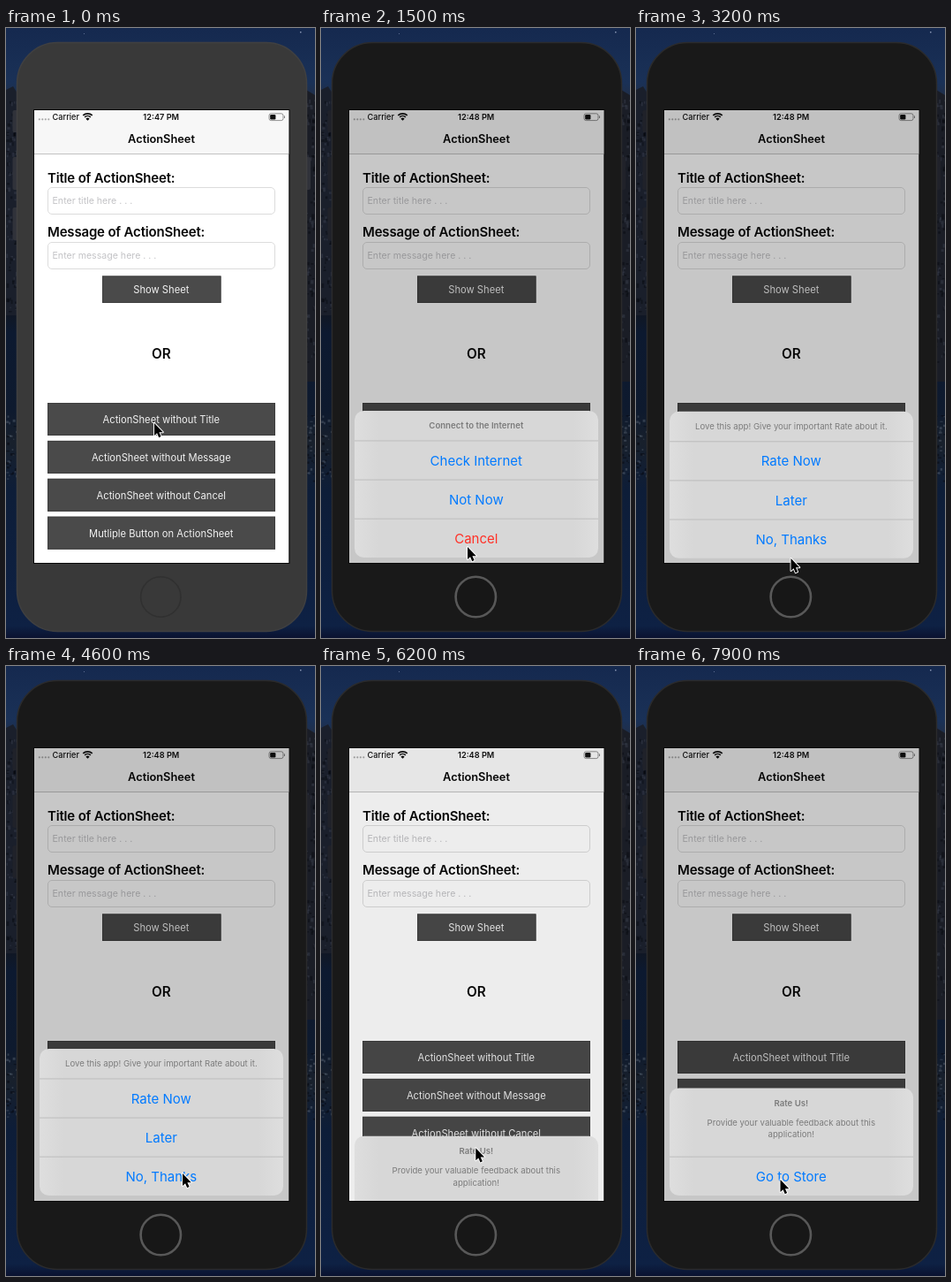
An HTML page with a canvas that plays this animation: 350 by 690 pixels, repeating every 8 s.

```html
<!DOCTYPE html>
<html lang="en">
<head>
<meta charset="utf-8">
<title>Action sheets</title>
<style>
html, body { margin: 0; width: 100%; height: 100%; overflow: hidden; background: #0d1b38; }
canvas { display: block; width: 350px; height: 690px; }
</style>
</head>
<body>
<canvas id="stage"></canvas>
<script>
const W = 350, H = 690, LOOP = 8000, STEP = 100;
const SANS = 'Inter, Roboto, "Liberation Sans", sans-serif';
const BLUE = '#007aff', RED = '#ff3026';
const canvas = document.getElementById('stage');
const ratio = window.devicePixelRatio || 1;
canvas.width = W * ratio;
canvas.height = H * ratio;
const ctx = canvas.getContext('2d');
ctx.scale(ratio, ratio);

const SCREEN = { x: 32, y: 93, w: 288.5, h: 512 };

const sheets = [
  { open: 300, close: 1990, top: 433, head: [['Connect to the Internet', 450, 600]],
    rows: ['Check Internet', 'Not Now', 'Cancel'] },
  { open: 2790, close: 4890, top: 433, head: [['Love this app! Give your important Rate about it.', 450, 400]],
    rows: ['Rate Now', 'Later', 'No, Thanks'] },
  { open: 6090, close: Infinity, top: 477.5,
    head: [['Rate Us!', 494.5, 600],
      ['Provide your valuable feedback about this', 516.5, 400],
      ['application!', 530, 400]],
    rows: ['Go to Store'] }
];

// time, x, y of the pointer tip
const track = [
  [0, 168, 447], [500, 168, 447], [1200, 166, 587], [2000, 166, 587],
  [2400, 182, 493], [2600, 182, 488], [2800, 182, 488], [3200, 175.5, 600],
  [3600, 178, 609], [4300, 200, 574], [4900, 200, 574], [5500, 172.5, 475],
  [5600, 172.5, 475], [5900, 172, 531], [6100, 172, 531], [6500, 193, 622],
  [7000, 198, 622], [7400, 199, 588], [7500, 199, 588], [7900, 163.5, 581]
];

const clamp = v => Math.max(0, Math.min(1, v));
const smooth = v => v * v * (3 - 2 * v);

// critically damped spring, 0 to 1
function spring(ms) {
  if (ms <= 0) return 0;
  const p = 18.26 * ms / 1000;
  return 1 - (1 + p) * Math.exp(-p);
}

function pointerAt(t) {
  for (let i = 1; i < track.length; i++) {
    const [t0, x0, y0] = track[i - 1], [t1, x1, y1] = track[i];
    if (t <= t1) {
      const k = smooth(clamp((t - t0) / (t1 - t0)));
      return [x0 + (x1 - x0) * k, y0 + (y1 - y0) * k];
    }
  }
  return track[track.length - 1].slice(1);
}

function fillRect(x, y, w, h, color) {
  ctx.fillStyle = color;
  ctx.fillRect(x, y, w, h);
}

function roundRect(x, y, w, h, r) {
  ctx.beginPath();
  ctx.roundRect(x, y, w, h, r);
}

function polygon(points, color) {
  ctx.beginPath();
  points.forEach(p => ctx.lineTo(p[0], p[1]));
  ctx.closePath();
  ctx.fillStyle = color;
  ctx.fill();
}

// y is the middle of the capitals
function text(str, x, y, size, color, weight = 400, align = 'center', gap = 0) {
  ctx.font = `${weight} ${size}px ${SANS}`;
  ctx.letterSpacing = gap + 'px';
  ctx.textAlign = align;
  ctx.fillStyle = color;
  ctx.fillText(str, x, y + size * 0.364);
}

function seeded(seed) {
  return () => (seed = (seed * 16807) % 2147483647) / 2147483647;
}

function drawBackdrop() {
  const g = ctx.createLinearGradient(0, 0, 0, H);
  [[0, '#15294f'], [0.09, '#1a3157'], [0.13, '#252c3b'], [0.2, '#191d28'],
    [0.33, '#151a25'], [0.47, '#101724'], [0.5, '#0c1930'], [0.63, '#0e1a2e'],
    [0.68, '#18202c'], [0.76, '#0d1d38'], [0.98, '#0e2144'], [1, '#0a1230']]
    .forEach(([p, c]) => g.addColorStop(p, c));
  ctx.fillStyle = g;
  ctx.fillRect(0, 0, W, H);
  polygon([[330, 78], [340, 70], [350, 76], [350, 400], [330, 400]], '#1a1d26');
  polygon([[0, 70], [8, 66], [18, 82], [18, 325], [0, 325]], '#1a1f2b');
  const rnd = seeded(73);
  for (let i = 0; i < 220; i++) {
    const left = rnd() < 0.5;
    const x = left ? rnd() * 14 : 338 + rnd() * 12;
    const y = 80 + rnd() * (left ? 240 : 300);
    fillRect(x, y, 1 + rnd() * 2.5, 1 + rnd() * 4, rnd() < 0.5 ? 'rgba(80,88,104,.28)' : 'rgba(4,6,12,.4)');
  }
  for (let i = 0; i < 70; i++) {
    const x = rnd() < 0.5 ? rnd() * 14 : 338 + rnd() * 12;
    fillRect(x, 438 + rnd() * 76, 1 + rnd() * 3, 1 + rnd() * 2, rnd() < 0.5 ? 'rgba(110,120,136,.35)' : 'rgba(6,9,16,.55)');
  }
  fillRect(333, 4, 1.5, 1.5, '#8795b3');
  fillRect(88, 6, 1, 1, '#5c6d91');
}

function drawPhone(active) {
  const body = active ? '#191919' : '#393939';
  const keys = active ? '#20222a' : '#30323a';
  [[93, 25], [146, 37], [203, 37]].forEach(([y, h]) => {
    roundRect(7.5, y, 8, h, 2);
    ctx.fillStyle = keys;
    ctx.fill();
  });
  roundRect(337, 146, 8, 37, 2);
  ctx.fill();

  roundRect(12.5, 16.5, 328, 666, 46);
  ctx.fillStyle = body;
  ctx.fill();
  ctx.strokeStyle = active ? '#2b2b2c' : '#404041';
  ctx.lineWidth = 1.5;
  ctx.stroke();

  ctx.beginPath();
  ctx.arc(175.3, 643.5, 22.7, 0, Math.PI * 2);
  ctx.fillStyle = active ? '#171717' : body;
  ctx.fill();
  ctx.strokeStyle = active ? '#585858' : '#303030';
  ctx.lineWidth = active ? 2.6 : 1.6;
  ctx.stroke();
  fillRect(SCREEN.x - 1, SCREEN.y - 1, SCREEN.w + 2, SCREEN.h + 2, '#0b0b0b');
}

function drawStatus(clock) {
  for (let i = 0; i < 4; i++) {
    ctx.beginPath();
    ctx.arc(37.8 + i * 3.5, 103.3, 1.1, 0, Math.PI * 2);
    ctx.fillStyle = '#a9a9a9';
    ctx.fill();
  }
  text('Carrier', 52.5, 100.6, 9.2, '#111', 500, 'left');
  text(clock, 175.7, 100.6, 9.2, '#111', 600);

  ctx.strokeStyle = '#111';
  ctx.lineWidth = 1.7;
  [4.7, 7.4].forEach(r => {
    ctx.beginPath();
    ctx.arc(92.5, 104.2, r, -Math.PI * 0.75, -Math.PI * 0.25);
    ctx.stroke();
  });
  ctx.beginPath();
  ctx.moveTo(92.5, 104.8);
  ctx.arc(92.5, 104.8, 3, -Math.PI * 0.75, -Math.PI * 0.25);
  ctx.fillStyle = '#111';
  ctx.fill();

  roundRect(298, 96.8, 16, 7.8, 2.2);
  ctx.strokeStyle = '#777';
  ctx.lineWidth = 0.8;
  ctx.stroke();
  roundRect(299.2, 98, 6.2, 5.4, 1.2);
  ctx.fillStyle = '#111';
  ctx.fill();
  fillRect(315, 99.4, 1, 2.6, '#888');
}

function drawField(y, hint) {
  roundRect(47.5, y + 0.5, 257, 30, 4.5);
  ctx.strokeStyle = '#d8d8d8';
  ctx.lineWidth = 0.9;
  ctx.stroke();
  text(hint, 52.5, y + 15.6, 10.6, '#c3c3c6', 400, 'left');
}

function drawButton(x, y, w, h, label) {
  fillRect(x, y, w, h, '#4a4a4a');
  ctx.strokeStyle = '#3e3e3e';
  ctx.lineWidth = 1;
  ctx.strokeRect(x + 0.5, y + 0.5, w - 1, h - 1);
  text(label, 175.8, y + h / 2 + 0.4, 11.2, '#f2f2f2');
}

function drawPage(clock) {
  fillRect(SCREEN.x, SCREEN.y, SCREEN.w, SCREEN.h, '#fff');
  fillRect(SCREEN.x, SCREEN.y, SCREEN.w, 49, '#f7f7f7');
  fillRect(SCREEN.x, 142, SCREEN.w, 0.9, '#bcbcbc');
  drawStatus(clock);
  text('ActionSheet', 176, 125.6, 12.8, '#080808', 600);
  text('Title of ActionSheet:', 47, 169.6, 15, '#080808', 600, 'left', -0.18);
  drawField(180, 'Enter title here . . .');
  text('Message of ActionSheet:', 47, 231, 15, '#080808', 600, 'left', -0.18);
  drawField(242, 'Enter message here . . .');
  drawButton(109, 280.5, 134.5, 30.5, 'Show Sheet');
  text('OR', 175.8, 368.5, 15.3, '#080808', 600);
  ['ActionSheet without Title', 'ActionSheet without Message',
    'ActionSheet without Cancel', 'Mutliple Button on ActionSheet']
    .forEach((label, i) => drawButton(47, 424 + i * 42.9, 258, 37, label));
}

function drawSheet(sheet, t) {
  const closing = t > sheet.close;
  const shown = closing ? 1 - spring(t - sheet.close) : spring(t - sheet.open);
  const dim = closing ? 1 - clamp((t - sheet.close) / 400) : clamp((t - sheet.open) / 350);
  if (shown <= 0) return;
  fillRect(SCREEN.x, SCREEN.y, SCREEN.w, SCREEN.h, `rgba(0,0,0,${0.22 * dim})`);
  if (shown < 0.01) return;

  ctx.save();
  ctx.translate(0, (1 - shown) * (612 - sheet.top));
  const g = ctx.createLinearGradient(38, 0, 314, 0);
  [[0, '#dedede'], [0.1, '#d7d7d7'], [0.9, '#d7d7d7'], [1, '#dedede']]
    .forEach(([p, c]) => g.addColorStop(p, c));
  roundRect(38, sheet.top, 276, 599 - sheet.top, 10.5);
  ctx.fillStyle = g;
  ctx.fill();
  sheet.head.forEach(([str, y, weight]) => text(str, 175.8, y, 9.6, '#7b7b7b', weight));
  sheet.rows.forEach((label, i) => {
    const y = 577.3 - (sheet.rows.length - 1 - i) * 44.1;
    fillRect(38, y - 22.6, 276, 0.9, '#b9b9b9');
    text(label, 175.8, y, 15, label === 'Cancel' ? RED : BLUE);
  });
  ctx.restore();
}

function drawPointer(x, y) {
  ctx.save();
  ctx.translate(x, y);
  ctx.lineJoin = 'round';
  ctx.beginPath();
  [[0, 0], [0, 14], [3.1, 11.2], [5.2, 16.2], [7.6, 15.1], [5.4, 10.2], [9.8, 10.2]]
    .forEach(p => ctx.lineTo(p[0], p[1]));
  ctx.closePath();
  ctx.strokeStyle = '#fff';
  ctx.lineWidth = 1.9;
  ctx.stroke();
  ctx.fillStyle = '#000';
  ctx.fill();
  ctx.restore();
}

function draw(t) {
  drawBackdrop();
  drawPhone(t >= 100);
  ctx.save();
  ctx.beginPath();
  ctx.rect(SCREEN.x, SCREEN.y, SCREEN.w, SCREEN.h);
  ctx.clip();
  drawPage(t < 1500 ? '12:47 PM' : '12:48 PM');
  sheets.forEach(sheet => drawSheet(sheet, t));
  ctx.restore();
  drawPointer(...pointerAt(t));
}

const start = performance.now();
function tick() {
  const t = (performance.now() - start) % LOOP;
  draw(Math.floor(t / STEP) * STEP);
  requestAnimationFrame(tick);
}
tick();
</script>
</body>
</html>
```
